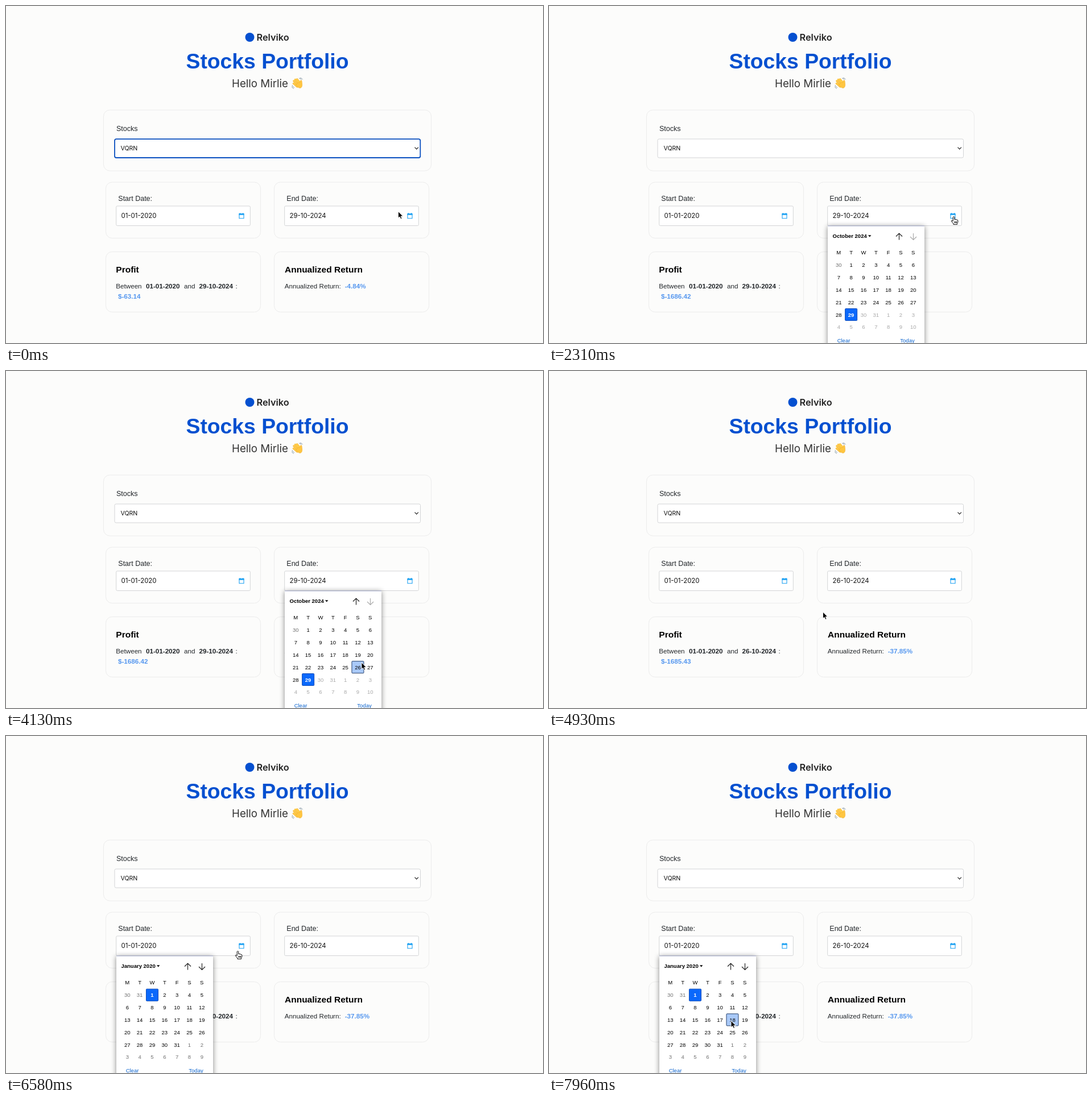
Write an HTML page that moves like this. It is 944 px wide and 593 px high and loops after 8 s.

```html
<!DOCTYPE html>
<html lang="en">
<head>
<meta charset="utf-8">
<title>Stocks Portfolio</title>
<style>
  html, body { margin: 0; width: 100%; height: 100%; overflow: hidden; background: #fcfcfb; }
  svg { display: block; width: 100%; height: 100%; }
  text { font: 11.65px "Liberation Sans", Arial, sans-serif; fill: #212529; white-space: pre; }
  .round { font-family: Inter, sans-serif; fill: #111; }
  .brand { font-size: 16.3px; font-weight: 600; fill: #222; }
  .title { font-size: 37.3px; font-weight: 700; fill: #0550d0; text-anchor: middle; }
  .hello { font-size: 18.7px; fill: #333; }
  .label { font-size: 12.5px; }
  .head { font-size: 15.5px; font-weight: 700; fill: #000; }
  .bold { font-weight: 700; }
  .value { font-weight: 700; fill: #5597ef; }
  .ticker { font-size: 10.6px; }
  .date { font-size: 11.4px; }
  .card { fill: #fcfcfb; stroke: #ececec; }
  .field { fill: #fff; stroke: #d3d4d6; }
  .focus { fill: none; stroke: #0a50c0; stroke-width: 1.8; }
  .line { fill: none; stroke: #222; stroke-width: 1.2; }
  .popup { fill: #fff; filter: drop-shadow(0 1px 5px #0007); }
  .cal text { font-size: 9.5px; fill: #000; text-anchor: middle; }
  .cal .month { font-weight: 700; text-anchor: start; }
  .cal .link { fill: #0b63ce; }
  .cal .other { fill: #707070; }
  .cal .off { fill: #a8a8a8; }
  .cal .on { fill: #fff; font-weight: 700; }
  .chosen { fill: #0a68fb; stroke: #0a48b8; }
  .hover { fill: #a9c9f8; stroke: #26406b; }
</style>
</head>
<body>
<svg id="stage" viewBox="0 0 944 593">
  <defs>
    <g id="dateIcon">
      <path d="M-4 -3.5H4V4.5H-4Z" fill="#fff" stroke="#1da1f2" stroke-width="1.1"/>
      <path d="M-4.5 -4H4.5V-1.6H-4.5ZM-3.2 -5.2H-2V-4H-3.2ZM2 -5.2H3.2V-4H2Z" fill="#1da1f2"/>
    </g>
  </defs>

  <circle cx="428.5" cy="55" r="8" fill="#0550d0"/>
  <text class="round brand" x="440.5" y="61">Relviko</text>
  <text class="title" x="459.5" y="110">Stocks Portfolio</text>
  <text class="round hello" x="397" y="142.5">Hello Mirlie</text>

  <g transform="translate(512 136)" fill="none" stroke-linecap="round">
    <path d="M-6 -4L1 3M-3.5 -6.5L3.5 1M-.3 -7L5 -1M-6.6 .4L0 6" stroke="#f2ae2e" stroke-width="3.2"/>
    <path d="M-6 -4.3L1 2.7M-3.5 -6.8L3.5 .7M-.3 -7.3L5 -1.3M-6.6 .1L0 5.7" stroke="#ffcb47" stroke-width="2.5"/>
    <path d="M-2 3C1 8 4.500 9.500 7 7.500C9 5.800 8.800 2 8.300 -1C8.200 -3 8 -5 7 -5.500C5.500 -6 5.300 -3 5 -1.500L1 -1Z" fill="#ffc641" stroke="#f2ae2e" stroke-width=".6"/>
    <path d="M3.500 -9Q6.500 -8.500 7.200 -6.600M5.500 -9.600Q8.500 -8.800 9.300 -7M-9 3.500Q-8 6.500 -5.500 7.500M-9.500 6Q-8.600 8.500 -6.500 9.300" stroke="#8296a3" stroke-width=".9"/>
  </g>

  <rect class="card" x="171.500" y="183" width="576" height="107" rx="11"/>
  <text class="label" x="194" y="220">Stocks</text>
  <rect class="field" x="191" y="234" width="537.500" height="33" rx="2.500"/>
  <rect class="focus" id="focus" x="191" y="234.200" width="537.300" height="32.800" rx="3"/>
  <text class="round ticker" x="201.500" y="254">VQRN</text>
  <path class="line" d="M718.500 248.600L721.700 251.800L724.900 248.600"/>

  <g id="cards"></g>

  <text class="head" x="193.300" y="468.500">Profit</text>
  <text x="193.300" y="496.700">Between</text>
  <text class="bold" x="246" y="496.700">01-01-2020</text>
  <text x="313" y="496.700">and</text>
  <text class="bold" id="until" x="339.500" y="496.700"></text>
  <text x="403.500" y="496.700">:</text>
  <text class="value" id="profit" x="197" y="515.200"></text>
  <text class="head" x="490" y="468.500">Annualized Return</text>
  <text x="489.700" y="496.700">Annualized Return:</text>
  <text class="value" id="rate" x="595.700" y="496.700"></text>

  <g id="popups"></g>

  <path id="arrow" d="M0 0V11.600L2.600 9.300L4.500 13.300L6.500 12.400L4.700 8.500H8.300Z" fill="#000" stroke="#fff" stroke-width=".9"/>
  <path id="hand" d="M-1.300 .8Q0 -.8 1.300 .8V5Q2.600 4.200 3.600 5.400Q4.900 4.700 5.600 6Q7.200 5.500 7.300 7.200V9.500Q7 11 6 12V13.800H-.6V12.400Q-3 10 -4.300 7.600Q-3.800 6 -1.300 8Z M1.500 8.500V11.500M3.300 8.500V11.500M5 8.500V11.500"
    fill="#fff" stroke="#000" stroke-width="1" stroke-linejoin="round"/>
</svg>
<script>
const LOOP = 8000, PITCH = 21.83;
const TIMES = { result: 420, openEnd: 1880, pick: 4380, openStart: 6080 };
const $ = id => document.getElementById(id);

function add(parent, tag, attrs, content = "") {
  const el = document.createElementNS("http://www.w3.org/2000/svg", tag);
  for (const key in attrs) el.setAttribute(key, attrs[key]);
  el.textContent = content;
  parent.append(el);
  return el;
}
const label = (parent, x, y, content, cls = "") => add(parent, "text", { x, y, class: cls }, content);
const show = (el, on) => { el.style.display = on ? "" : "none"; };
const put = (el, text) => { if (el.textContent !== text) el.textContent = text; };

function dateCard(x, name, value) {
  const g = add($("cards"), "g", { transform: `translate(${x} 0)` });
  add(g, "rect", { class: "card", x: 0, y: 310, width: 272, height: 98.5, rx: 11 });
  add(g, "rect", { class: "card", x: 0, y: 432.5, width: 272, height: 106, rx: 11 });
  label(g, 21.8, 342.5, name, "label");
  add(g, "rect", { class: "field", x: 18.2, y: 352, width: 235.6, height: 34.5, rx: 2 });
  add(g, "use", { href: "#dateIcon", x: 238.5, y: 369.3 });
  return label(g, 27, 373, value, "round date");
}

// Day 1 sits in column `first`; days after `last` cannot be chosen.
function calendar(x, month, { first, days, before, chosen, last }) {
  const g = add($("popups"), "g", { class: "cal", transform: `translate(${x} 387)` });
  add(g, "rect", { class: "popup", x: 0, y: 0, width: 170, height: 224 });
  add(g, "path", { d: "M0 0H170", stroke: "#a9afd0" });
  label(g, 8.5, 21, month, "month");
  add(g, "path", { d: "M71 16.300H76.400L73.700 19.400Z" });
  add(g, "path", { class: "line", d: "M125.500 24.500V13M120 18.500L125.500 13L131 18.500" });
  add(g, "path", { class: "line", d: "M150.500 13V24.500M145 19L150.500 24.500L156 19", style: last < days ? "stroke:#aaa" : "" });
  [..."MTWTFSS"].forEach((day, i) => label(g, 19.3 + i * PITCH, 49.8, day));

  const cell = cls => add(g, "rect", { class: cls, width: 21, height: 21, rx: 1 });
  const place = (el, i) => {
    el.setAttribute("x", 8.8 + i % 7 * PITCH);
    el.setAttribute("y", 58.2 + Math.floor(i / 7) * PITCH);
  };
  const hover = cell("hover");
  place(cell("chosen"), first + chosen - 1);
  for (let i = 0; i < 42; i++) {
    const day = i - first + 1;
    const inside = day > 0 && day <= days;
    const number = day < 1 ? before + day : inside ? day : day - days;
    const cls = day === chosen ? "on" : day > last ? "off" : inside ? "" : "other";
    label(g, 19.3 + i % 7 * PITCH, 72.2 + Math.floor(i / 7) * PITCH, number, cls);
  }
  label(g, 28, 205.3, "Clear", "link");
  label(g, 140, 205.3, "Today", "link");

  return {
    show: on => show(g, on),
    point(px, py) {
      const col = Math.floor((px - x - 8.4) / PITCH);
      const row = Math.floor((py - 387 - 57.8) / PITCH);
      const i = row * 7 + col, day = i - first + 1;
      const on = col >= 0 && col < 7 && row >= 0 && row < 6 && day <= last && day !== chosen;
      show(hover, on);
      if (on) place(hover, i);
    }
  };
}

dateCard(175.5, "Start Date:", "01-01-2020");
const endDate = dateCard(471.5, "End Date:", "");
const endCal = calendar(490, "October 2024", { first: 1, days: 31, before: 30, chosen: 29, last: 29 });
const startCal = calendar(194, "January 2020", { first: 2, days: 31, before: 31, chosen: 1, last: 99 });

// time, x, y of the pointer tip
const path = [
  [0, 689.5, 361.5], [200, 689.5, 361.5], [750, 711.5, 370.5], [2600, 711.5, 370.5],
  [3000, 688, 430], [3400, 658, 515], [3680, 645, 538], [4000, 625, 513],
  [4450, 625, 513], [4880, 481.5, 424], [5050, 481.5, 424], [5650, 411.5, 371],
  [6300, 411.5, 371], [6540, 407.5, 378.5], [6640, 407.5, 378.5], [7000, 362, 440],
  [7420, 320, 501], [LOOP, 320, 501]
];

function pointer(t) {
  const k = path.findIndex(p => p[0] > t);
  const [t0, x0, y0] = path[k - 1], [t1, x1, y1] = path[k];
  const u = (t - t0) / (t1 - t0), e = u * u * (3 - 2 * u);
  return [x0 + (x1 - x0) * e, y0 + (y1 - y0) * e];
}

function render(t) {
  const [x, y] = pointer(t);
  const picked = t >= TIMES.pick;
  const until = picked ? "26-10-2024" : "29-10-2024";
  put(endDate, until);
  put($("until"), until);
  put($("profit"), picked ? "$-1685.43" : t < TIMES.result ? "$-63.14" : "$-1686.42");
  put($("rate"), picked ? "-37.85%" : t < TIMES.result ? "-4.84%" : "-37.86%");
  show($("focus"), t < TIMES.openEnd);

  endCal.show(t >= TIMES.openEnd && !picked);
  startCal.show(t >= TIMES.openStart);
  endCal.point(x, y);
  startCal.point(x, y);

  const isHand = t > 640 && t < 2680 || t > 5560 && t < 6700;
  show($("hand"), isHand);
  show($("arrow"), !isHand);
  $(isHand ? "hand" : "arrow").setAttribute("transform", `translate(${x} ${y})`);
}

const start = performance.now();
function frame() {
  render((performance.now() - start) % LOOP);
  requestAnimationFrame(frame);
}
frame();
</script>
</body>
</html>
```
